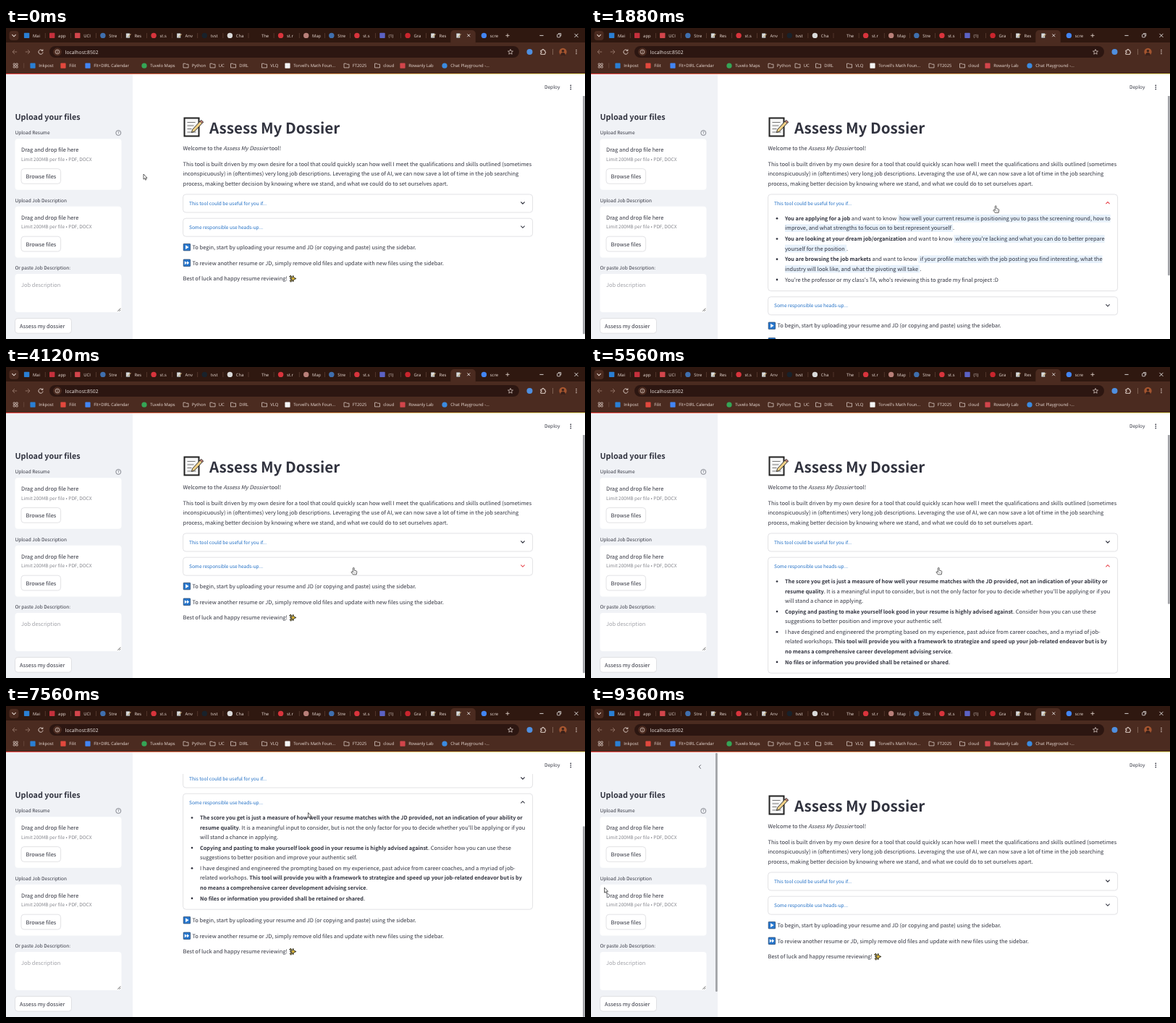
Write an HTML page with a canvas that moves like this. It is 800 px wide and 430 px high and loops after 9400 ms.

```html
<!DOCTYPE html>
<html lang="en">
<head>
<meta charset="utf-8">
<title>Resume helper demo</title>
<style>
html, body { margin: 0; width: 100%; height: 100%; overflow: hidden; background: #fff; }
canvas { display: block; width: 800px; height: 430px; }
</style>
</head>
<body>
<canvas id="stage"></canvas>
<script>
const LOOP = 9400, TOP = 64, VIEW = 366, CLOSED_HEIGHT = 373;
const INK = '#31333f', BLUE = '#1c6cc4', RED = '#e8434b', LINE = '#d6d6da';
const FRAME = '#2f1810', BAR = '#4b2b20', PALE = '#eadcd5', DIM = '#96776a';
const PAGE = '"Noto Sans CJK JP","Noto Sans CJK SC","Noto Sans CJK",sans-serif';
const UI = '"Open Sans","Noto Sans",sans-serif';
const BODY = 7.47, BOLD = 7.27, SMALL = 6.54;

const canvas = document.getElementById('stage');
const ctx = canvas.getContext('2d');
const ratio = window.devicePixelRatio || 1;
canvas.width = 800 * ratio;
canvas.height = 430 * ratio;

// ---------- drawing helpers ----------
function text(s, x, y, size = BODY, color = INK, style = '', family = PAGE) {
  ctx.font = `${style} ${size}px ${family}`;
  ctx.fillStyle = color;
  ctx.fillText(s, x, y);
  return ctx.measureText(s).width;
}
const ui = (s, x, y, size = 5.9, color = PALE) => text(s, x, y, size, color, '', UI);

function rect(x, y, w, h, color) {
  ctx.fillStyle = color;
  ctx.fillRect(x, y, w, h);
}
function box(x, y, w, h, r, fill, stroke, width = 0.7) {
  ctx.beginPath();
  ctx.roundRect(x, y, w, h, r);
  paint(fill, stroke, width);
}
function circle(x, y, r, fill, stroke, width = 0.7) {
  ctx.beginPath();
  ctx.arc(x, y, r, 0, 7);
  paint(fill, stroke, width);
}
function shape(x, y, path, fill, stroke, width = 0.8) {
  ctx.save();
  ctx.translate(x, y);
  const p = new Path2D(path);
  if (fill) { ctx.fillStyle = fill; ctx.fill(p); }
  if (stroke) { ctx.strokeStyle = stroke; ctx.lineWidth = width; ctx.stroke(p); }
  ctx.restore();
}
function paint(fill, stroke, width) {
  if (fill) { ctx.fillStyle = fill; ctx.fill(); }
  if (stroke) { ctx.strokeStyle = stroke; ctx.lineWidth = width; ctx.stroke(); }
}
function clipped(x, y, w, h, draw) {
  ctx.save();
  ctx.beginPath();
  ctx.rect(x, y, w, h);
  ctx.clip();
  draw();
  ctx.restore();
}

// Inline marks: *bold*, _italic_, [highlight]; the style carries over to the next line.
function rich(s, x, y, style = {}) {
  const tint = '#e7f1fb';
  for (const part of s.split(/([*_[\]])/)) {
    if (part === '*') style.bold = !style.bold;
    else if (part === '_') style.italic = !style.italic;
    else if (part === '[' || part === ']') {
      style.mark = part === '[';
      rect(x, y - 8, 2.2, 10.6, tint);
      x += 2.1;
    } else if (part) {
      const size = style.bold ? BOLD : BODY;
      const font = style.bold ? 'bold' : style.italic ? 'italic' : '';
      if (style.mark) {
        ctx.font = `${size}px ${PAGE}`;
        rect(x, y - 8, ctx.measureText(part).width, 10.6, tint);
      }
      x += text(part, x, y, size, INK, font);
    }
  }
}

// ---------- small pictures ----------
function memo(x, y, size) {
  ctx.save();
  ctx.translate(x, y);
  ctx.scale(size / 28, size / 28);
  shape(0, 0, 'M2 2H22V27H2Z', '#f7f7f7', '#222', 2);
  shape(0, 0, 'M6 8H17M6 12.5H15M6 17H12M6 21.5H18', null, '#777', 1.2);
  shape(0, 0, 'M25 5L28 7.500L16 20.500L12 22L13 18Z', '#f0cf86', '#333', 1);
  shape(0, 0, 'M25 5L28 7.500L26.500 9.200L23.500 6.600Z', '#d98a80', '#333', 0.8);
  ctx.restore();
}
function playKey(x, y, double) {
  box(x + 0.4, y + 0.4, 9.4, 9.4, 0.5, '#2878cf', '#173a63');
  if (double) shape(x, y, 'M2 2.6L5.200 5.100L2 7.600ZM5.200 2.600L8.400 5.100L5.200 7.600Z', '#fff');
  else shape(x, y, 'M3.300 2.300L7.800 5.100L3.300 7.900Z', '#fff');
}
function sparkles(x, y) {
  const star = (cx, cy, r) => {
    const q = r * 0.28;
    shape(cx, cy, `M0 ${-r}L${q} ${-q}L${r} 0L${q} ${q}L0 ${r}L${-q} ${q}L${-r} 0L${-q} ${-q}Z`, '#e3bd3c', '#26261c', 0.9);
  };
  star(x + 5.4, y + 5, 4.3);
  star(x + 2, y + 2.2, 1.8);
  star(x + 2.4, y + 8, 1.8);
}
function chevron(x, y, up, color) {
  const d = up ? -1.3 : 1.3;
  shape(x, y, `M-2.600 ${-d}L0 ${d}L2.600 ${-d}`, null, color, 1.1);
}
function folder(x) {
  shape(x, 52, 'M-3.500 -2.800H-0.600L0.400 -1.800H3.500V2.900H-3.500Z', null, PALE, 0.7);
}

// ---------- browser window ----------
// icon kinds: m = memo, o = circle, s = square, - = none
const TABS = [
  ['Mai', 's#2a7fd4'], ['app', 's#c4303c'], ['UCI', 's#d2454b'], ['Stre', 'o#3f6fae'],
  ['Res', 'm'], ['st.s', 'o#d8343c'], ['Anv', 'm'], ['tvst', 'o#18222b'], ['Cha', 'o#d9d9d9'],
  ['The', '-'], ['st.r', 'o#d8343c'], ['Map', 'o#b98079'], ['Stre', 'o#3f6fae'],
  ['st.s', 'o#d8343c'], ['(1)', 's#5b62c4'], ['Gra', 'o#c9252d'], ['Res', 'm'], ['', 'm'], ['scre', 'o#4285f4']
];
const BOOKMARKS = [
  [37, 'Inkpost', 's#2a7fd4'], [79, 'Filit', 's#e2483d'], [113, 'Flt+DIRL Calendar', 's#4285f4'],
  [191, 'Tuvelo Maps', 'o#35a556'], [248.5, 'Python'], [285.5, 'UC'], [314, 'DIRL'], [357, 'VLQ'],
  [389, "Torvell's Math Foun...", 's#f4f4f4'], [470.5, 'FT2025'], [513, 'cloud'],
  [548, 'Rowanly Lab', 's#d2454b'], [606, 'Chat Playground -...', 'o#3b8be0']
];
function icon(kind, x, y, r) {
  if (kind[0] === 'm') memo(x - r, y - r, 2 * r);
  if (kind[0] === 'o') circle(x, y, r, kind.slice(1));
  if (kind[0] === 's') box(x - r, y - r, 2 * r, 2 * r, 0.8, kind.slice(1));
}

function browser() {
  rect(0, 0, 800, 21, FRAME);
  rect(0, 20, 800, 43, BAR);
  box(4.5, 4, 13, 13, 4, BAR);
  chevron(11, 10.5, false, PALE);
  TABS.forEach(([label, kind], i) => {
    const x = 28.6 + 35.1 * i;
    if (i === 17) {
      box(x - 11, 3, 34.5, 20, [5, 5, 0, 0], BAR);
      shape(x + 14, 10.3, 'M-1.900 -1.900L1.900 1.900M1.900 -1.900L-1.900 1.900', null, '#fff', 0.8);
    } else if (i < 16) rect(x + 25.3, 7, 0.6, 7, '#6b4a3d');
    icon(kind, x, 10.4, 3.7);
    clipped(x + 8, 3, i === 18 ? 14 : 12, 16, () => ui(label, x + 8.4, 12.6));
  });
  shape(693, 10.4, 'M-2.600 0H2.600M0 -2.600V2.600', null, PALE, 0.8);
  shape(740, 10.4, 'M-2.600 0H2.600', null, '#fff', 0.8);
  box(761.6, 8.8, 4, 4, 0.6, null, '#fff');
  shape(0, 0, 'M763 7.600H766.800V11.400', null, '#fff', 0.7);
  shape(788, 10.4, 'M-2.500 -2.500L2.500 2.500M2.500 -2.500L-2.500 2.500', null, '#fff', 0.8);

  shape(12, 33, 'M3.200 0H-3M0 -3L-3 0L0 3', null, DIM, 0.9);
  shape(30, 33, 'M-3.200 0H3M0 -3L3 0L0 3', null, DIM, 0.9);
  shape(48, 33, 'M2.400 -1.900A3.100 3.100 0 1 0 3.100 0.600M2.900 -3.500V-1.400H0.800', null, PALE, 0.9);
  box(60, 25, 649, 16, 8, '#2c1611');
  circle(71, 33, 5.8, BAR);
  circle(71, 33, 2.9, null, PALE);
  shape(71, 33, 'M0 -0.500V1.600M0 -1.700V-1', null, PALE, 0.7);
  ui('localhost:8502', 81.8, 35.6, 6.8, '#f4ebe6');
  shape(697, 33, 'M0 -3.500L1 -1.100L3.500 -0.900L1.600 0.700L2.200 3.200L0 1.900L-2.200 3.200L-1.600 0.700L-3.500 -0.900L-1 -1.100Z', null, PALE, 0.7);
  circle(723.5, 33, 4, '#4f8fe0');
  shape(742, 33, 'M-3.200 -2H-1V-3.400H1V-2H2.800V0H3.600V1.600H2.800V3.400H-3.200V1.300H-2V-0.300H-3.200Z', null, PALE, 0.9);
  rect(755.3, 29, 0.7, 8, DIM);
  circle(769.5, 33, 5.2, '#a4552f');
  clipped(764.5, 28, 10, 10.2, () => {
    circle(769.5, 31.8, 1.8, '#3a211a');
    circle(769.5, 37.2, 3.3, '#3a211a');
  });
  for (const dy of [-2.6, 0, 2.6]) circle(788, 33 + dy, 0.75, PALE);

  for (let i = 0; i < 4; i++)
    box(10.2 + 3.6 * (i % 2), 49 + 3.6 * (i >> 1), 2.4, 2.4, 0.3, null, PALE);
  rect(24.5, 48.5, 0.6, 7, '#76564a');
  for (const [x, label, kind] of BOOKMARKS) {
    if (kind) icon(kind, x, 52.2, 3.6); else folder(x);
    ui(label, x + 8.2, 54.4);
  }
}

// ---------- page ----------
function button(label, x, y, w) {
  box(x, y, w, 20.7, 4, '#fff', LINE);
  text(label, x + 6.6, y + 13.3);
}
function uploader(label, y) {
  text(label, 12.5, y, SMALL);
  box(12.5, y + 5.8, 147, 70.6, 4, '#fff');
  text('Drag and drop file here', 21, y + 23.7);
  text('Limit 200MB per file • PDF, DOCX', 21, y + 36.3, SMALL, '#85868d');
  button('Browse files', 21, y + 47.2, 54.6);
}
function sidebar(hovered) {
  rect(0, TOP, 175, VIEW, '#f0f2f6');
  text('Upload your files', 12.5, 127.2, 10.8, INK, 'bold');
  uploader('Upload Resume', 147.4);
  uploader('Upload Job Description', 241);
  circle(155.3, 145, 3.5, null, '#5b5d67');
  text('?', 153.9, 147.2, 5.6, '#5b5d67');
  text('Or paste Job Description:', 12.5, 334.3, SMALL);
  box(12.5, 340, 147, 53, 4, '#fff');
  text('Job description', 21, 357.8, BODY, '#a2a3a9');
  shape(158.3, 391.6, 'M0 -4L-4 0M0 -1.800L-1.800 0', null, '#444', 0.8);
  button('Assess my dossier', 12.5, 401.4, 78);
  if (hovered) {
    shape(150.5, 84, 'M1.300 -2.600L-1.300 0L1.300 2.600', null, '#5b5d67', 1);
    box(172, TOP + 1, 2.8, 330, 1.2, '#a3a4a8');
  }
}

const USEFUL = [
  '•*You are applying for a job* and want to know [how well your current resume is positioning you to pass the screening round, how to',
  'improve, and what strengths to focus on to best represent yourself].',
  '•*You are looking at your dream job/organization* and want to know [where you\'re lacking and what you can do to better prepare',
  'yourself for the position].',
  '•*You are browsing the job markets* and want to know [if your profile matches with the job posting you find interesting, what the',
  'industry will look like, and what the pivoting will take].',
  '•You\'re the professor or my class\'s TA, who\'s reviewing this to grade my final project :D'
];
const HEADS_UP = [
  '•*The score you get is just a measure of how well your resume matches with the JD provided, not an indication of your ability or',
  'resume quality*. It is a meaningful input to consider, but is not the only factor for you to decide whether you\'ll be applying or if you',
  'will stand a chance in applying.',
  '•*Copying and pasting to make yourself look good in your resume is highly advised against*. Consider how you can use these',
  'suggestions to better position and improve your authentic self.',
  '•I have desgined and engineered the prompting based on my experience, past advice from career coaches, and a myriad of job-',
  'related workshops. *This tool will provide you with a framework to strategize and speed up your job-related endeavor but is by',
  'no means a comprehensive career development advising service*.',
  '•*No files or information you provided shall be retained or shared*.'
];

function expander(y, title, lines, extra, up, hot) {
  box(244.6, y, 483, 25 + extra, 4, '#fff', LINE);
  text(title, 253, y + 14.5, SMALL, BLUE);
  chevron(714, y + 11.8, up, hot ? RED : INK);
  if (extra < 1) return;
  clipped(245, y + 24, 482, extra, () => {
    let lineY = y + 36, style;
    lines.forEach((line, i) => {
      const bullet = line[0] === '•';
      if (i) lineY += bullet ? 14.8 : 13.4;
      if (bullet) {
        style = {};
        circle(257, lineY - 2.7, 1.35, INK);
      }
      rich(bullet ? line.slice(1) : line, 268, lineY, style);
    });
  });
}

function mainPage(state) {
  rect(175, TOP, 625, VIEW, '#fff');
  clipped(175, 94, 622, 336, () => {
    ctx.translate(0, -state.scroll);
    memo(244.5, 122.5, 28);
    text('Assess My Dossier', 281, 146, 20.6, INK, 'bold');
    rich('Welcome to the _Assess My Dossier_ tool!', 244.5, 169.2);
    ['This tool is built driven by my own desire for a tool that could quickly scan how well I meet the qualifications and skills outlined (sometimes',
     'inconspicuously) in (oftentimes) very long job descriptions. Leveraging the use of AI, we can now save a lot of time in the job searching',
     'process, making better decision by knowing where we stand, and what we could do to set ourselves apart.'
    ].forEach((line, i) => text(line, 244.5, 190.7 + 13.4 * i));
    expander(230, 'This tool could be useful for you if...', USEFUL, state.first, state.firstUp, state.firstHot);
    ctx.translate(0, state.first);
    expander(263.2, 'Some responsible use heads-up...', HEADS_UP, state.second, state.secondUp, state.secondHot);
    ctx.translate(0, state.second);
    playKey(244.8, 298, false);
    text('To begin, start by uploading your resume and JD (or copying and paste) using the sidebar.', 257.4, 305.9);
    playKey(244.8, 319.6, true);
    text('To review another resume or JD, simply remove old files and update with new files using the sidebar.', 257.4, 327.5);
    text('Best of luck and happy resume reviewing!', 244.5, 349.3);
    sparkles(391.3, 341.5);
  });
  text('Deploy', 744, 84.4, SMALL);
  for (const dy of [-2.6, 0, 2.6]) circle(780.3, 82 + dy, 0.85, INK);
  if (!state.hovered) return;
  const thumbTop = TOP + state.scroll * VIEW / state.height;
  clipped(796, 94, 4, 336, () => box(797, thumbTop, 2.8, VIEW * VIEW / state.height, 1.2, '#a3a4a8'));
}

// ---------- motion ----------
const clamp = v => Math.min(1, Math.max(0, v));
const easeOut = p => 1 - (1 - clamp(p)) ** 5;
const easeBoth = p => p * p * (3 - 2 * p);
const between = (t, from, to) => t >= from && t < to;
const toggle = (t, open, close) => easeOut((t - open) / 500) - easeOut((t - close) / 500);
const wheel = (t, start) => 52 * easeBoth(clamp((t - start) / 150));

const PATH = [
  [0, 190, 202], [120, 190, 202], [850, 559.2, 245.7], [3500, 559.2, 245.7], [4000, 480.3, 277.2],
  [6850, 480.3, 277.2], [7500, 417.5, 147.5], [7650, 417.5, 147.5], [7900, 417.5, 133],
  [8600, 417.5, 133], [9300, 18.5, 251], [LOOP, 18.5, 251]
];
function pointer(t) {
  const i = Math.max(1, PATH.findIndex(p => p[0] > t));
  const [a, b] = [PATH[i - 1], PATH[i]];
  const p = easeBoth((t - a[0]) / (b[0] - a[0]));
  return [a[1] + (b[1] - a[1]) * p, a[2] + (b[2] - a[2]) * p];
}
function drawPointer(x, y, hand) {
  if (hand) {
    shape(x, y, 'M-0.900 0.700Q0 -0.700 0.900 0.700V4L3.700 4.700Q4.700 5 4.500 6.200L3.900 9.700H-0.900L-3.200 6.700Q-3.300 5.400 -2 5.800L-0.900 6.700Z', '#fff', '#222', 0.7);
    shape(x, y, 'M1 6.200V8M2.500 6.200V8', null, '#555', 0.4);
  } else {
    shape(x, y, 'M0 0V7.200L1.600 5.700L2.600 8.200L3.900 7.600L2.900 5.300H5Z', '#fff', '#222', 0.7);
  }
}

function draw(t) {
  ctx.setTransform(ratio, 0, 0, ratio, 0, 0);
  ctx.textRendering = 'geometricPrecision';
  const first = 108.5 * toggle(t, 920, 3150);
  const second = 135 * toggle(t, 4550, 8100);
  const height = CLOSED_HEIGHT + first + second;
  const wanted = wheel(t, 5850) + wheel(t, 6400) + wheel(t, 6800) - 3 * wheel(t, 8700);
  const [x, y] = pointer(t);
  const overSidebar = x < 175;
  const firstHot = between(t, 780, 3600);
  const secondHot = between(t, 3800, 6900) || between(t, 7750, 8250);
  mainPage({
    first, second, height, firstHot, secondHot,
    hovered: !overSidebar,
    firstUp: between(t, 920, 3150),
    secondUp: between(t, 4550, 8100),
    scroll: Math.max(0, Math.min(wanted, height - VIEW))
  });
  sidebar(overSidebar);
  browser();
  const glow = ctx.createLinearGradient(0, 0, 800, 0);
  glow.addColorStop(0, '#ff4b4b');
  glow.addColorStop(1, '#fffd80');
  rect(0, TOP - 1, 800, 1, glow);
  drawPointer(x, y, firstHot || secondHot);
}

const start = performance.now();
function tick() {
  draw((performance.now() - start) % LOOP);
  requestAnimationFrame(tick);
}
tick();
</script>
</body>
</html>
```
